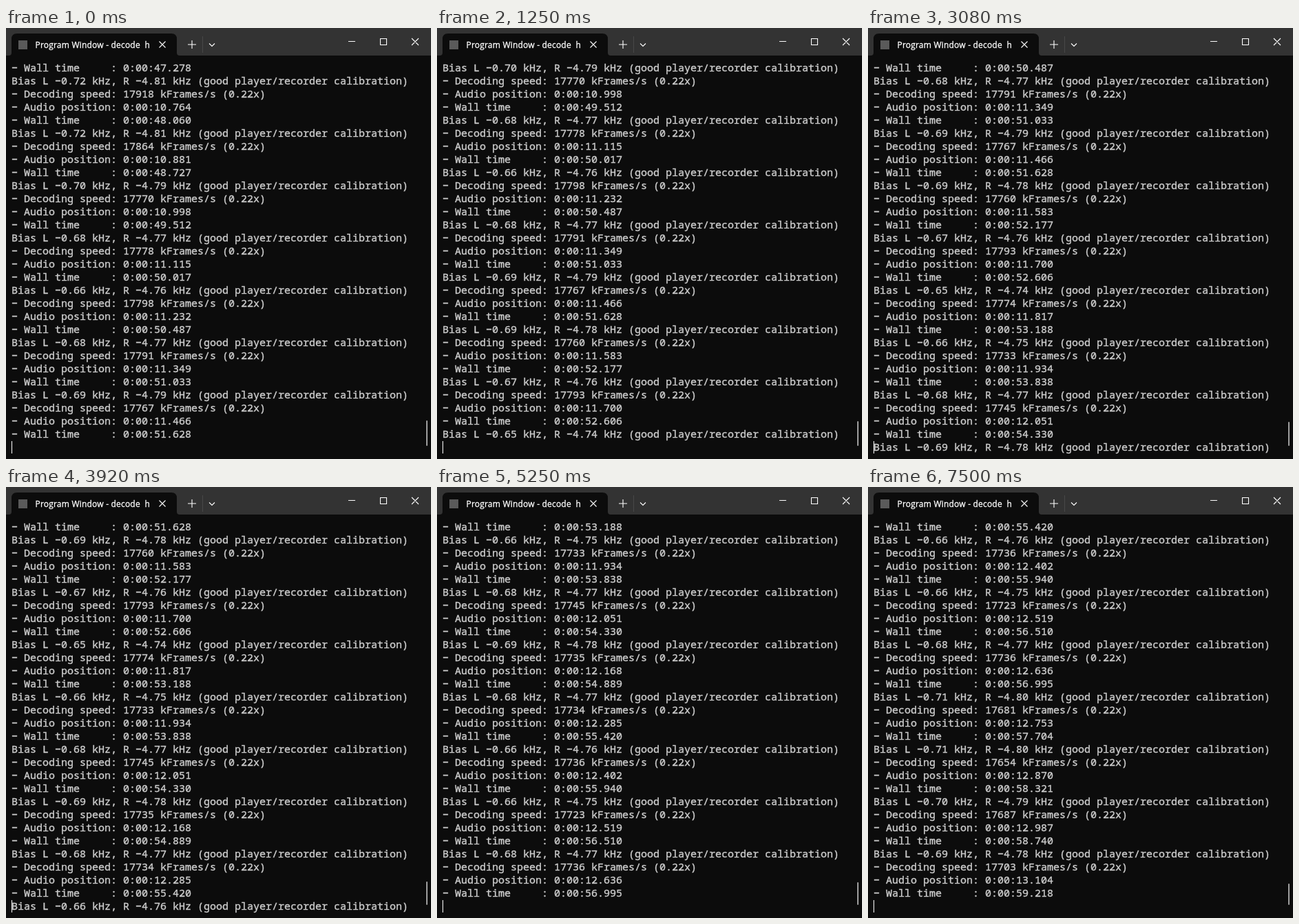
Write an HTML page that moves like this. It is 617 px wide and 626 px high and loops after 7580 ms.

```html
<!DOCTYPE html>
<html lang="en">
<head>
<meta charset="utf-8">
<title>Decoder log</title>
<style>
  html, body { margin: 0; width: 100%; height: 100%; overflow: hidden; background: #0c0c0c; }
  svg { display: block; width: 100%; height: 100%; }
  text { white-space: pre; }
  .log { font: 500 15px "Noto Sans Mono", "DejaVu Sans Mono", monospace; fill: #ccc; stroke: #ccc; stroke-width: .4; }
  .title { font: 500 12px "Open Sans", "Noto Sans", sans-serif; letter-spacing: .2px; fill: #fff; stroke: #fff; stroke-width: .3; }
  .line { fill: none; stroke: #fff; stroke-width: 1.1; }
</style>
</head>
<body>
<svg viewBox="0 0 617 626" xmlns="http://www.w3.org/2000/svg">
  <clipPath id="titleClip"><rect x="42" y="10" width="166" height="28"/></clipPath>
  <rect width="617" height="626" fill="#0c0c0c"/>
  <rect width="617" height="40" fill="#333"/>
  <path d="M4 40Q8 40 8 36V16Q8 8 16 8H240Q248 8 248 16V36Q248 40 252 40Z" fill="#0c0c0c"/>
  <rect x="18" y="18" width="13" height="13" fill="#5a5a5a"/>
  <g clip-path="url(#titleClip)"><text class="title" x="42.5" y="29">Program Window - decode  h</text></g>
  <path class="line" d="M222.5 19.5l9 9m0-9l-9 9"/>
  <path class="line" d="M264 24h12m-6-6v12" stroke-width="1.4"/>
  <path d="M285.5 12v24" stroke="#484848"/>
  <path class="line" d="M295 22.5l4 4 4-4"/>
  <path class="line" d="M497 19.5h10M543.5 15.5h9v9h-9zM589 15l10 10m0-10l-10 10"/>
  <g id="log" class="log"></g>
  <rect x="8" y="600" width="1" height="18" fill="#fff"/>
  <rect id="thumb" x="610" width="2" rx="1" fill="#9f9f9f"/>
</svg>
<script>
const LOOP = 7580, FPS = 12, ROWS = 30, ROW_HEIGHT = 19;
const CLOCK_START = 51.714;   // wall clock, in seconds, when the loop begins

// Wall clock at the end of each four-line report; it drives text and timing.
const walls = [
  47.278, 48.060, 48.727, 49.512, 50.017, 50.487, 51.033, 51.628, 52.177, 52.606, 53.188,
  53.838, 54.330, 54.889, 55.420, 55.940, 56.510, 56.995, 57.704, 58.321, 58.740, 59.218
];

// Frames by which a report's first line precedes the rest, repeating.
const leads = [4, 3, 0, 1, 1];

const endFrame = k => Math.round((walls[k] - CLOCK_START) * FPS);
const clock = seconds => "0:00:" + seconds.toFixed(3);

function lineText(n) {
  const k = Math.floor(n / 4);
  const wall = walls[k];
  const audio = 10.647 + 0.117 * k;
  const left = 0.67 + 0.0004 * (k - 11) ** 2 + 0.022 * Math.cos(2 * Math.PI * (k - 13) / 5.5);
  const right = 4.16 + 0.9 * left;
  return [
    `Bias L −${left.toFixed(2)} kHz, R −${right.toFixed(2)} kHz (good player/recorder calibration)`,
    `− Decoding speed: ${Math.round(80000 * audio / wall)} kFrames/s (${(audio / wall).toFixed(2)}x)`,
    `− Audio position: ${clock(audio)}`,
    `− Wall time     : ${clock(wall)}`
  ][n % 4];
}

// Number of the last line ended by a newline, and of the last line typed.
function progress(frame) {
  const k = walls.filter((_, i) => endFrame(i) <= frame).length;
  const done = 4 * k - 1;
  const age = frame - (endFrame(k) - leads[k % leads.length]);
  return { last: age > 0 ? done + 1 : done, typed: age >= 0 ? done + 1 : done };
}

const log = document.getElementById("log");
const thumb = document.getElementById("thumb");
const rows = Array.from({ length: ROWS }, (_, i) => {
  const row = document.createElementNS("http://www.w3.org/2000/svg", "text");
  row.setAttribute("x", 8);
  row.setAttribute("y", 63 + i * ROW_HEIGHT);
  return log.appendChild(row);
});

let shown;

function draw(time) {
  const frame = Math.floor((time + 5) * FPS / 1000);
  if (frame === shown) return;
  shown = frame;
  const { last, typed } = progress(frame);
  rows.forEach((row, i) => {
    const n = last - (ROWS - 2) + i;
    row.textContent = n <= typed ? lineText(n) : "";
  });
  const shrink = Math.floor((last - 24) / 10.4);
  thumb.setAttribute("y", 570 + shrink);
  thumb.setAttribute("height", 37 - shrink);
}

const startTime = performance.now();

function tick() {
  draw((performance.now() - startTime) % LOOP);
  requestAnimationFrame(tick);
}

tick();
</script>
</body>
</html>
```
